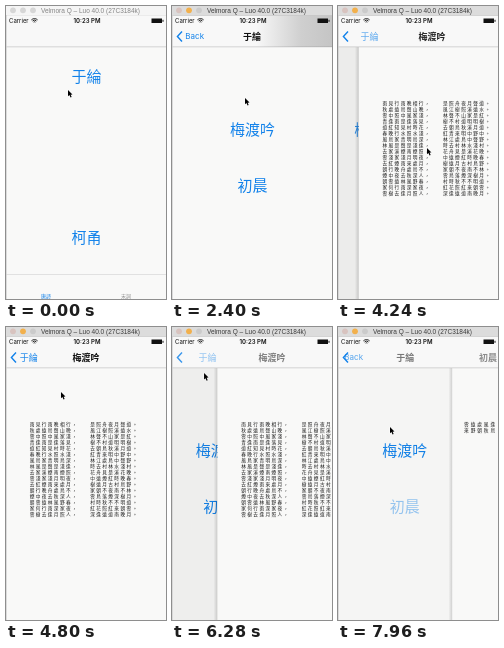
An HTML page with a canvas for the animation above (8 s loop, 160x293 px).

```html
<!DOCTYPE html>
<html lang="zh-Hant">
<head>
<meta charset="utf-8">
<title>Poem browser</title>
<style>
html, body { margin: 0; width: 100%; height: 100%; overflow: hidden; background: #f9f9f8; }
canvas { display: block; width: 100vw; height: 100vh; }
</style>
</head>
<body>
<canvas id="stage"></canvas>
<script>
const W = 160, H = 293, NAV = 41, LOOP = 8000, SLIDE = 650;
const BLUE = '#1282ea', PAPER = '#f9f9f8';
const CJK = '"Noto Sans CJK TC", "Noto Sans CJK JP", "Noto Sans CJK", sans-serif';
const LATIN = 'Inter, "Liberation Sans", sans-serif';
const POETS = ['于綸', '柯甬'], POEMS = ['梅渡吟', '初晨'];

// The page stack is poets, poems, verse.
const SLIDES = [
  { start: 1262, from: 0, to: 1 },
  { start: 3738, from: 1, to: 2, poem: 0 },
  { start: 6052, from: 2, to: 1, poem: 0 },
  { start: 7732, from: 1, to: 2, poem: 1 }
];
const POINTER = [
  [0, 62, 84], [160, 62, 84], [560, 77, 70], [800, 73, 72], [1440, 73, 72],
  [2080, 72, 84], [2400, 73, 92], [2920, 79, 118], [3120, 81, 120],
  [3800, 81, 120], [4240, 89, 142], [4520, 84, 125], [4800, 55, 65],
  [5400, 41, 33], [5720, 27, 33], [6100, 27, 33], [6280, 32, 46],
  [6880, 60, 112], [7400, 76, 176], [7740, 76, 176], [7960, 52, 100]
];

const canvas = document.getElementById('stage');
const g = canvas.getContext('2d');
const dpr = window.devicePixelRatio || 1;
canvas.width = W * dpr;
canvas.height = H * dpr;

const clamp = (v) => Math.min(1, Math.max(0, v));
const mix = (a, b, k) => a + (b - a) * k;
const ramp = (t, a, b) => clamp((t - a) / (b - a));
const ease = (k) => k * k * (3 - 2 * k);

function rect(x, y, w, h, color) {
  g.fillStyle = color;
  g.fillRect(x, y, w, h);
}

function text(str, x, cy, size, color, { alpha = 1, weight = 400, align = 'center', font = CJK } = {}) {
  if (alpha <= 0) return;
  g.save();
  g.globalAlpha *= alpha;
  g.font = `${weight} ${size}px ${font}`;
  g.textAlign = align;
  g.fillStyle = color;
  g.fillText(str, x, cy + size * 0.37);
  g.restore();
}

// Verse made of filler characters, picked by a small seeded generator.
const POOL = '山水花月春秋風雲江南舟行見遠村林樹人家雨煙青溪古道夜晚明朝來去不知何處是相逢時野鳥聲中落照紅深淺';
function makeVerse(rows, half, seed) {
  const pick = () => {
    seed = (seed * 16807) % 2147483647;
    return POOL[seed % POOL.length];
  };
  const part = () => Array.from({ length: half }, pick).join('');
  return Array.from({ length: rows }, () => `${part()}，  ${part()}。`);
}
const VERSES = [
  { lines: makeVerse(16, 7, 421), x: 26, pitch: 6.05 },
  { lines: makeVerse(2, 5, 97), x: 14, pitch: 6.6 }
];

function poetsPage(alpha) {
  rect(0, NAV, W, H, PAPER);
  text(POETS[0], 80.5, 70, 15, BLUE, { alpha });
  text(POETS[1], 80.5, 231, 15, BLUE);
  rect(0, 268, W, 0.6, '#d2d2d2');
  text('唐詩', 40, 290, 5, BLUE, { weight: 500 });
  text('宋詞', 120, 290, 5, '#929292', { weight: 500 });
}

function poemsPage(alphas) {
  rect(0, NAV, W, H, PAPER);
  POEMS.forEach((name, i) => text(name, 80.5, 123.5 + 56 * i, 15, BLUE, { alpha: alphas[i] }));
}

function versePage(index) {
  const { lines, x, pitch } = VERSES[index];
  rect(0, NAV, W, H, PAPER);
  lines.forEach((line, row) => [...line].forEach((ch, col) =>
    text(ch, x + col * pitch, 97 + row * 6, 4.7, '#1c1c1c')));
}

function shifted(dx, draw) {
  g.save();
  g.translate(dx, 0);
  draw();
  g.restore();
}

// k is how far the upper page covers the lower one.
function stack(lower, upper, k) {
  const edge = W * (1 - k);
  shifted(-0.3 * W * k, lower);
  if (k <= 0) return;
  rect(0, NAV, edge, H, `rgba(0,0,0,${0.06 * k})`);
  if (k < 1) {
    const shade = g.createLinearGradient(edge - 4, 0, edge, 0);
    shade.addColorStop(0, 'rgba(0,0,0,0)');
    shade.addColorStop(1, 'rgba(0,0,0,.16)');
    rect(edge - 4, NAV, 4, H, shade);
  }
  shifted(edge, upper);
}

function chevron(alpha) {
  g.save();
  g.globalAlpha = alpha;
  g.strokeStyle = BLUE;
  g.lineWidth = 1.4;
  g.beginPath();
  g.moveTo(10, 25.5);
  g.lineTo(5.4, 30.5);
  g.lineTo(10, 35.5);
  g.stroke();
  g.restore();
}

// q moves the titles, fade is the opacity of the upper title.
function navBar(level, q, fade, poem, backAlpha) {
  rect(0, 9, W, NAV - 9, '#f8f8f8');
  rect(0, NAV - 0.4, W, 0.6, '#b8b8b8');
  const titles = ['', POETS[0], POEMS[poem]];
  const labels = ['', 'Back', POETS[0]];
  const slide = mix(80, 22.7, q);
  const title = (i, x, alpha) => text(titles[i], x, 30.5, 9, '#111', { weight: 700, alpha });
  const label = (i, x, alpha) => i === 1
    ? text(labels[i], x, 30.5, 8, BLUE, { font: LATIN, alpha })
    : text(labels[i], x, 30.5, 9, BLUE, { alpha });

  title(level, slide, 1 - 2 * q);
  label(level, 23 - 33 * q, 1 - 1.3 * q);
  if (q > 0) {
    title(level + 1, 80 + 90 * (1 - q), fade);
    label(level + 1, slide, (2 * q - 1) * backAlpha);
  }
  chevron((level ? 1 : q) * backAlpha);
}

function statusBar() {
  text('Carrier', 3, 14.8, 6, '#111', { align: 'left', font: LATIN });
  text('10:23 PM', 81, 14.8, 6, '#111', { weight: 600, font: LATIN });
  g.strokeStyle = '#111';
  g.lineWidth = 0.9;
  for (const r of [1.2, 2.8, 4.4]) {
    g.beginPath();
    g.arc(28.5, 17, r, -Math.PI * 0.75, -Math.PI * 0.25);
    g.stroke();
  }
  rect(145.5, 12.5, 10.5, 4.5, '#111');
  rect(156.5, 13.8, 1, 2, '#111');
}

function windowBar(active) {
  rect(0, 0, W, 9.5, active ? '#dcdcdc' : '#f5f5f5');
  rect(0, 9, W, 0.5, active ? '#bdbdbd' : '#dedede');
  const dots = active ? ['#d8c3bf', '#f2b04c', '#cbcbcb'] : ['#d6d6d6', '#d6d6d6', '#d6d6d6'];
  dots.forEach((color, i) => {
    g.fillStyle = color;
    g.beginPath();
    g.arc(7 + i * 10, 4.3, 2.9, 0, 7);
    g.fill();
  });
  text('Velmora Q – Luo 40.0 (27C3184k)', 84.5, 4.2, 6.5, active ? '#3c3c3c' : '#858585',
    { font: '"Liberation Sans", Arial, sans-serif' });
}

function pointer(t) {
  let i = POINTER.findIndex((p) => p[0] > t);
  if (i < 0) i = POINTER.length;
  const a = POINTER[i - 1], b = POINTER[i] || a;
  const k = b === a ? 0 : ramp(t, a[0], b[0]);
  g.save();
  g.translate(mix(a[1], b[1], k), mix(a[2], b[2], k));
  g.scale(0.9, 0.9);
  g.beginPath();
  [[0, 0], [0, 7], [1.6, 5.6], [2.8, 8.4], [4.1, 7.8], [2.9, 5.2], [5, 5]]
    .forEach(([x, y]) => g.lineTo(x, y));
  g.closePath();
  g.lineJoin = 'round';
  g.lineWidth = 0.9;
  g.strokeStyle = '#fff';
  g.stroke();
  g.fillStyle = '#000';
  g.fill();
  g.restore();
}

// A tapped button dims at once and recovers while the pages slide.
function tapAlpha(t, pressed, slide) {
  return t < pressed ? 1 : 0.2 + 0.8 * ease(ramp(t, slide.start, slide.start + SLIDE));
}

function draw(t) {
  g.setTransform(dpr, 0, 0, dpr, 0, 0);
  rect(0, 0, W, H, PAPER);

  const slide = SLIDES.filter((s) => s.start <= t).pop() || SLIDES[0];
  const p = ease(ramp(t, slide.start, slide.start + SLIDE));
  const push = slide.to > slide.from;
  const level = Math.min(slide.from, slide.to);
  const progress = (power) => push ? p ** power : 1 - p ** power;
  const k = progress(1);
  const poem = slide.poem || 0;

  const poems = () => poemsPage([tapAlpha(t, 3400, SLIDES[1]), tapAlpha(t, 7600, SLIDES[3])]);
  if (level === 0) stack(() => poetsPage(tapAlpha(t, 1100, SLIDES[0])), poems, k);
  else stack(poems, () => versePage(poem), k);

  const backAlpha = t < 5920 ? 1 : 0.3 + 0.7 * ramp(t, 6052, 6352);
  navBar(level, progress(1.2), progress(0.6), poem, backAlpha);

  const haze = ramp(t, 1800, 2100) * (1 - ramp(t, 2700, 2920));
  if (haze > 0) {
    const shade = g.createLinearGradient(84, 0, W, 0);
    shade.addColorStop(0, 'rgba(120,120,120,0)');
    shade.addColorStop(0.6, `rgba(120,120,120,${0.32 * haze})`);
    shade.addColorStop(1, `rgba(120,120,120,${0.4 * haze})`);
    rect(84, 9, W - 84, NAV - 9, shade);
  }
  statusBar();
  windowBar(t >= 1040);
  rect(0, 9, 0.7, H, '#cfcfcf');
  pointer(t);
}

const origin = performance.now();
function tick() {
  draw((performance.now() - origin) % LOOP);
  requestAnimationFrame(tick);
}
tick();
</script>
</body>
</html>
```
